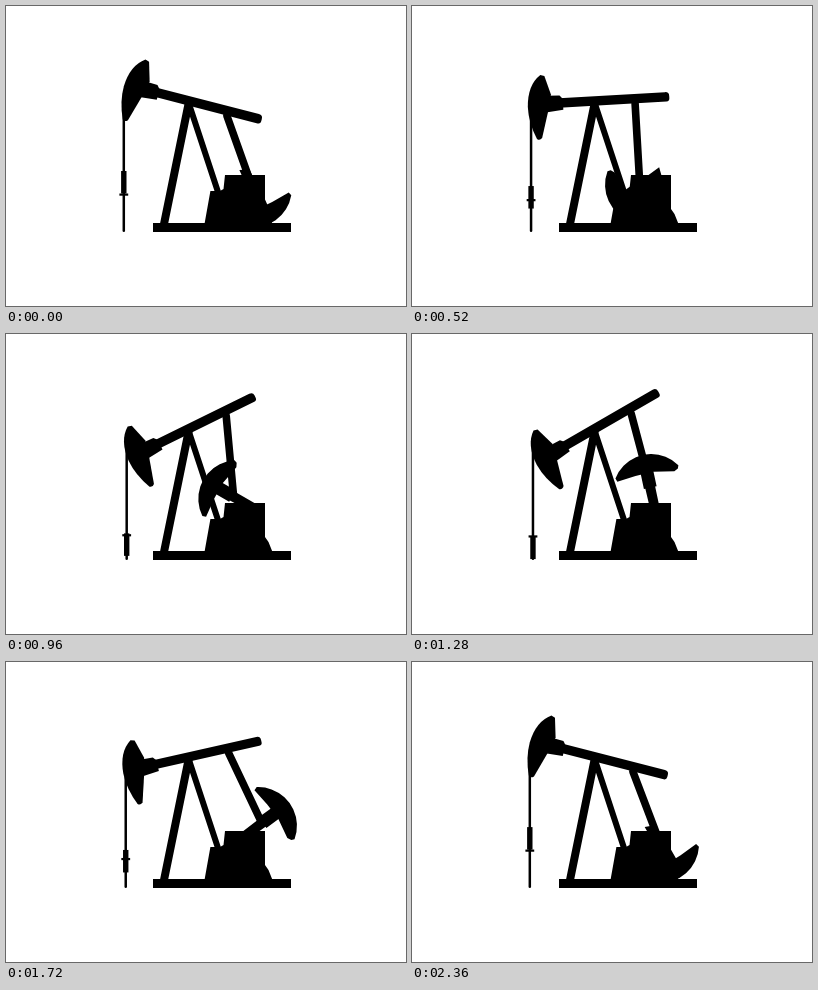
Animation, 400 px wide and 300 px high, one loop 2400 ms. Source, as an HTML page with a canvas:

```html
<!DOCTYPE html>
<html lang="en">
<head>
<meta charset="utf-8">
<title>Pumpjack</title>
<style>
  html, body { margin: 0; width: 100%; height: 100%; overflow: hidden; background: #fff; }
  canvas { display: block; }
</style>
</head>
<body>
<canvas id="stage" width="400" height="300"></canvas>
<script>
const ctx = document.getElementById('stage').getContext('2d');
const LOOP = 2400, STEP = 40;
const RAD = Math.PI / 180;
const PIVOT = { x: 183, y: 97 };
const CRANK = { x: 242, y: 171.2 };

function polygon(...points) {
  ctx.beginPath();
  points.forEach(([x, y]) => ctx.lineTo(x, y));
  ctx.fill();
}

function bar(x1, y1, x2, y2, width) {
  ctx.lineWidth = width;
  ctx.beginPath();
  ctx.moveTo(x1, y1);
  ctx.lineTo(x2, y2);
  ctx.stroke();
}

function rotated(center, angle, draw) {
  ctx.save();
  ctx.translate(center.x, center.y);
  ctx.rotate(angle);
  draw();
  ctx.restore();
}

function place(center, angle, x, y) {
  const c = Math.cos(angle), s = Math.sin(angle);
  return [center.x + x * c - y * s, center.y + x * s + y * c];
}

function drawFrame() {
  ctx.fillRect(147, 217, 138, 9);
  bar(182.5, 98, 157.8, 219, 8);
  bar(183, 98, 212, 186, 6);
  polygon([204.4, 185], [214, 185], [217.5, 183], [219, 169], [259, 169],
    [259, 203], [262.5, 208], [266.5, 218], [198.5, 218]);
}

function drawBeam() {
  // walking beam with a rounded tail
  ctx.beginPath();
  ctx.roundRect(-40, -6.8, 114.5, 9.4, [0, 4, 3, 0]);
  ctx.fill();
  polygon([-48, -10], [-35, -9.5], [-32, -6], [-32, 5], [-48, 6.5]);
  // horse head
  ctx.beginPath();
  ctx.moveTo(-53, -31.2);
  ctx.lineTo(-49, -30);
  ctx.lineTo(-43.5, -11);
  ctx.lineTo(-47.5, 6.5);
  ctx.lineTo(-54.8, 32);
  ctx.quadraticCurveTo(-57.5, 34.8, -60, 32.5);
  ctx.quadraticCurveTo(-67.5, 16, -67.3, 0);
  ctx.quadraticCurveTo(-66.3, -22, -53, -31.2);
  ctx.fill();
}

function drawCrank() {
  polygon([-10, 5], [-6.5, -4.5], [18, -5], [18, -6.5], [36, -6.5],
    [36, 6.5], [18, 6.5], [18, 5]);
  // counterweight
  const spread = Math.atan2(32, 21.2);
  ctx.beginPath();
  ctx.arc(12.8, 0, 38.6, -spread, spread);
  ctx.lineTo(31, 31);
  ctx.lineTo(29, 27);
  ctx.lineTo(33, 6);
  ctx.lineTo(32.5, -12);
  ctx.lineTo(30.5, -31);
  ctx.fill();
}

function drawRod(drop) {
  const x = 117.8 + 3.2 * drop;
  const bodyTop = 165 + 38 * drop;
  const collar = 187.5 + 14 * drop;
  bar(x, 95 + 10 * drop, x, 224.8, 2.5);
  ctx.fillRect(x - 2.7, bodyTop, 5.4, 22.5);
  ctx.fillRect(x - 4.4, collar, 8.8, 2.2);
}

function render(time) {
  const phase = Math.floor((time % LOOP) / STEP) * STEP / LOOP * 2 * Math.PI;
  const swing = Math.cos(phase);
  const beamAngle = (-8 + 22.5 * swing) * RAD;
  const crankAngle = phase + 66 * RAD;

  ctx.fillStyle = '#fff';
  ctx.fillRect(0, 0, 400, 300);
  ctx.fillStyle = ctx.strokeStyle = '#000';
  ctx.lineCap = 'round';

  drawFrame();
  drawRod((1 - swing) / 2);
  rotated(PIVOT, beamAngle, drawBeam);
  rotated(CRANK, crankAngle, drawCrank);
  bar(...place(PIVOT, beamAngle, 40, 3), ...place(CRANK, crankAngle + 2 * RAD, 17, 0), 7.6);
}

function tick() {
  render(performance.now());
  requestAnimationFrame(tick);
}
tick();
</script>
</body>
</html>
```
